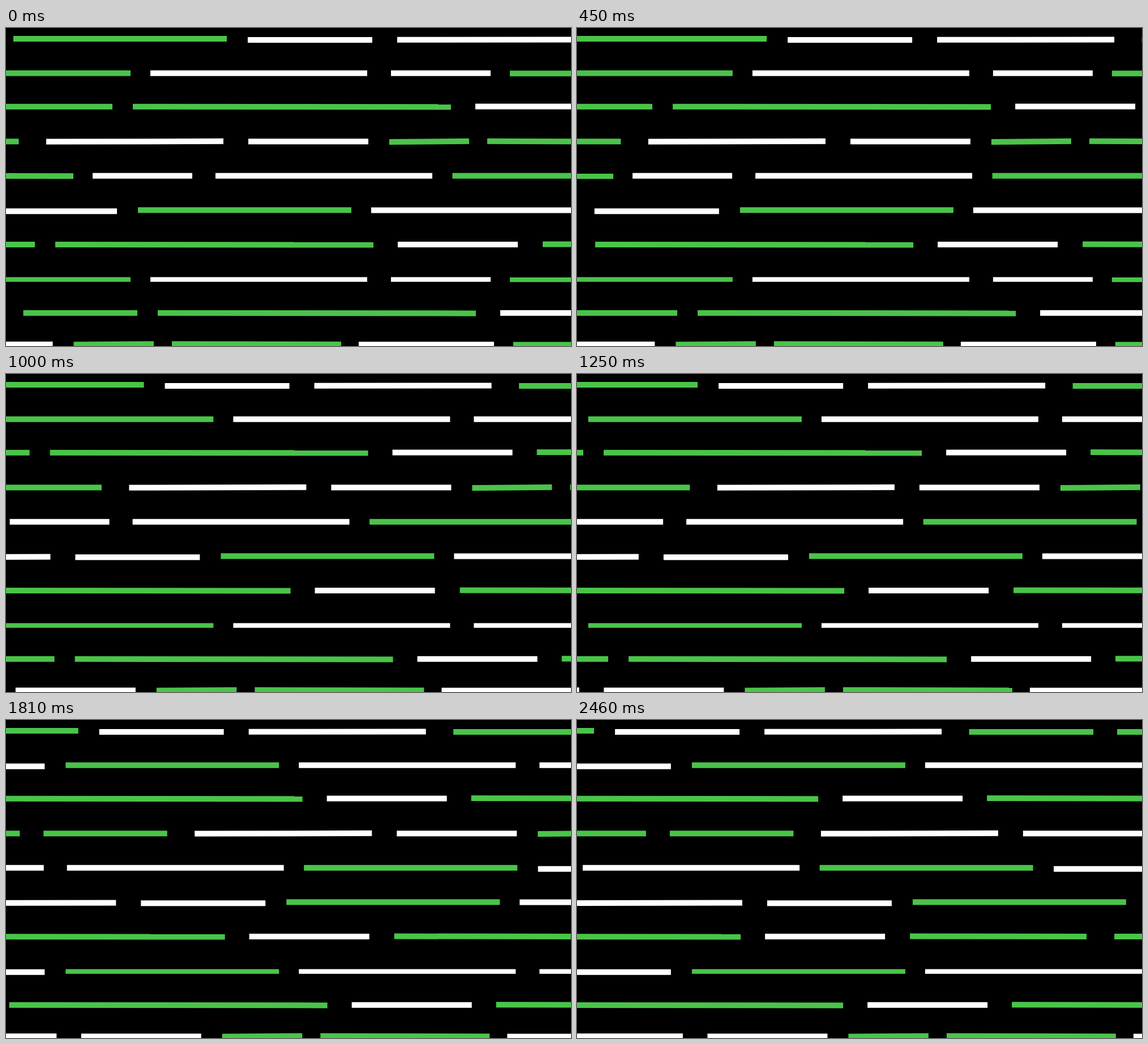
An HTML page that plays this animation: 998x561 px, repeating every 2480 ms.

```html
<!DOCTYPE html>
<html lang="en">
<head>
<meta charset="utf-8">
<title>Sliding bars</title>
<style>
html, body { margin: 0; width: 100%; height: 100%; overflow: hidden; background: #000; }
svg { display: block; width: 100%; height: 100%; }
</style>
</head>
<body>
<svg id="stage" viewBox="0 0 998 561"></svg>
<script>
const LOOP = 2480;
const UNIT = 6.1; // distance of one motion unit in px
const NS = 'http://www.w3.org/2000/svg';
const stage = document.getElementById('stage');

// A bar spans x1..x2; its ends sit dl and dr below the row's top edge.
const bar = fill => (x1, x2, dl = 0, dr = dl, h = 0) => ({ fill, x1, x2, dl, dr, h });
const g = bar('#4ac449');
const w = bar('#fff');

const wide = gap => [
  w(-414, -194, gap, gap, 10), g(-157, 220), w(255, 638), w(680, 856), g(890, 1267, 0.5)
];

// Rows alternate: the first goes left, the next right, and so on.
const rows = [
  { y: 14, bars: [g(13, 390), w(427, 647, 2), w(691, 1004, 1.8, 1.5), g(1052.5, 1272, 2), g(1314, 1455, 2)] },
  { y: 74.7, bars: wide(2) },
  { y: 133.5, bars: [g(-113, 188, 0.3), g(224, 786, 0.2, 0.8), w(829, 1041), g(1084, 1397, -0.5, 0)] },
  { y: 195.3, bars: [g(-537, -238), g(-196, 22.5), w(71, 384, 0.3, -0.5), w(428, 640), g(677, 818, 0.7, -0.6), g(850, 1149, -0.5, 0.3)] },
  { y: 255.7, bars: [g(-180, 119, 0, 0.6), w(153, 329), w(370, 753), g(788.5, 1165.5), w(1202, 1422, 2)] },
  { y: 316.2, bars: [w(-381, -68, 1.8, 1.3), w(-24, 196, 2), g(233, 610), w(645, 1028, 0.2)] },
  { y: 377, bars: [g(-150, 51), g(87, 649, 0, 0.6), w(692, 904), g(948, 1260, -0.5, 0), g(1309, 1528)] },
  { y: 439.5, h: 8.3, bars: wide(0.3) },
  { y: 497.8, bars: [g(30.5, 232), g(268, 830, 0, 0.6), w(873, 1085), g(1128, 1441, -0.6, 0)] },
  { y: 553, bars: [w(-486, -173), w(-129.5, 82.5, 0.3), g(119.5, 261, 0.6, -0.6), g(293, 592, -0.5, 0.3), w(623, 862, 0.6), g(896, 1273, 0.8)] }
];

const make = (tag, parent, attrs = {}) => {
  const el = parent.appendChild(document.createElementNS(NS, tag));
  for (const key in attrs) el.setAttribute(key, attrs[key]);
  return el;
};

const groups = rows.map(({ y, h = 10, bars }) => {
  const group = make('g', stage);
  for (const b of bars) {
    const l = y + b.dl, r = y + b.dr, t = b.h || h;
    make('path', group, { fill: b.fill, d: `M${b.x1} ${l}L${b.x2} ${r}V${r + t}L${b.x1} ${l + t}Z` });
  }
  return group;
});

// Pace of the motion: [step, units travelled]
const pace = [[0, 0], [8, 9], [19, 24], [30, 36], [35, 43], [41, 52], [48, 59]];

const stepTime = i => i === 0 ? 0
  : Math.min(2460, 50 * (i + 1) + (i >= 27 ? 10 : 0) + (i >= 38 ? 10 : 0));

function stepAt(t) {
  let i = 48;
  while (i > 0 && stepTime(i) > t) i--;
  return i;
}

function unitsAt(step) {
  let k = 1;
  while (pace[k][0] < step) k++;
  const [s0, u0] = pace[k - 1], [s1, u1] = pace[k];
  return Math.round(u0 + (u1 - u0) * (step - s0) / (s1 - s0));
}

function draw(t) {
  const shift = UNIT * unitsAt(stepAt(t));
  groups.forEach((group, i) =>
    group.setAttribute('transform', `translate(${i % 2 ? shift : -shift} 0)`));
}

const start = performance.now();
function tick() {
  draw((performance.now() - start) % LOOP);
  requestAnimationFrame(tick);
}
tick();
</script>
</body>
</html>
```
